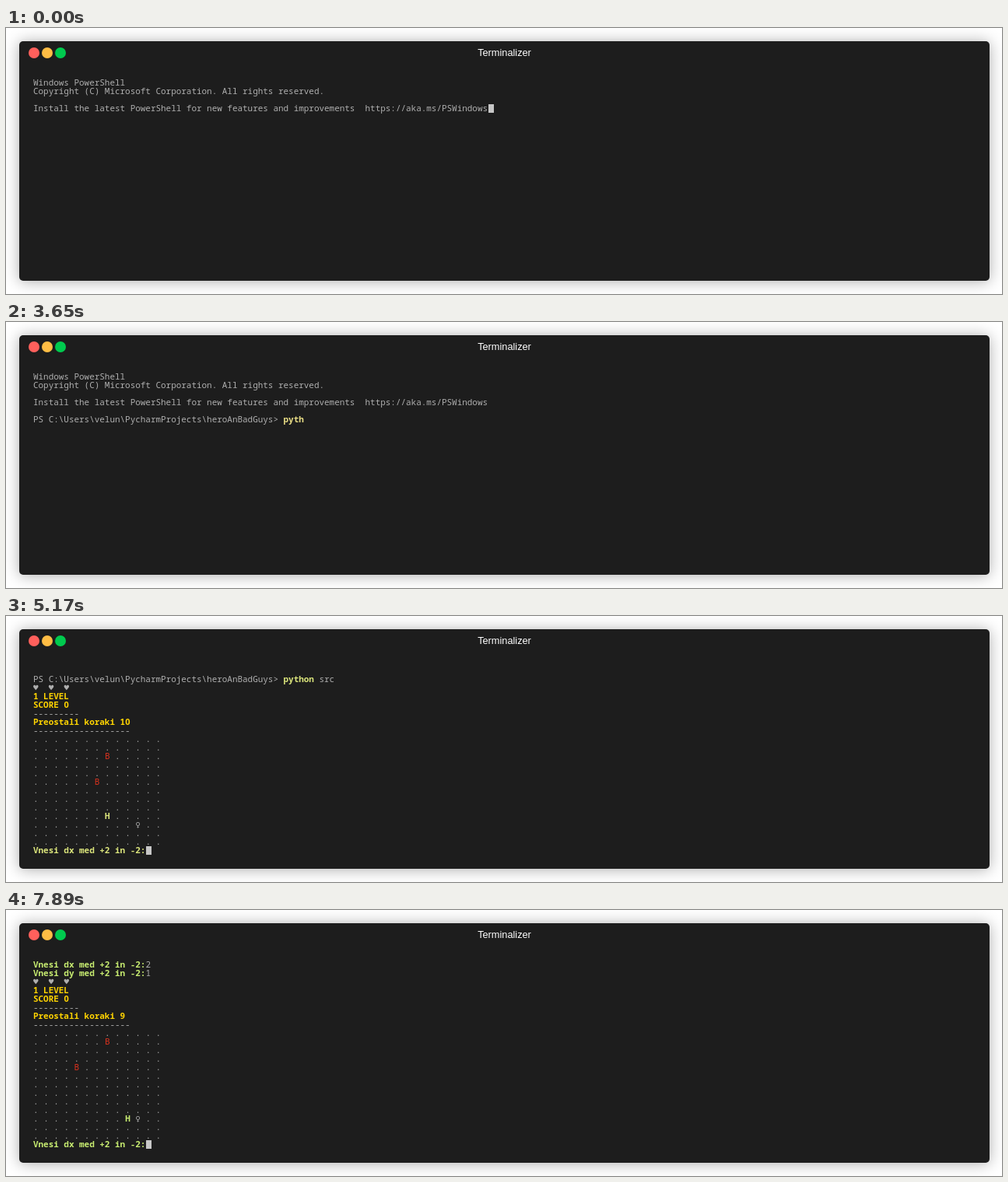
Recreate the animation shown at these times as an HTML page. Size 1280 by 342 pixels, loop 8000 ms.

```html
<!DOCTYPE html>
<html lang="en">
<head>
<meta charset="utf-8">
<title>Terminal session</title>
<style>
  html, body { margin: 0; width: 100%; height: 100%; overflow: hidden; background: #fff; }
  #window {
    position: absolute; left: 17px; top: 17px; width: 1247px; height: 308px;
    border-radius: 5px; background: #1d1d1d; box-shadow: 0 1px 19px rgba(0, 0, 0, .33);
  }
  .dot { position: absolute; top: 8px; width: 14px; height: 14px; border-radius: 50%; }
  #title {
    position: absolute; left: 0; right: 0; top: 5px; line-height: 20px; text-align: center;
    font-family: "Liberation Sans", Arial, sans-serif; font-size: 12.75px; color: #fff;
  }
  #screen {
    position: absolute; left: 35px; top: 64px; color: #afafaf; white-space: pre;
    font: 10.955px/11px "Noto Sans Mono", "DejaVu Sans Mono", monospace;
    font-variant-ligatures: none;
  }
  #screen div { height: 11px; }
  .accent { color: var(--accent); font-weight: 700; }
  .gold { color: #ffd400; font-weight: 700; }
  .zero { font-family: "Open Sans", sans-serif; }
  .enemy { color: #e0321e; }
  .sym { font-family: "DejaVu Sans Mono", monospace; }
  #cursor { position: absolute; width: 7px; height: 11px; background: #c7c7c7; }
</style>
</head>
<body>
<div id="window">
  <div class="dot" style="left:11.5px;background:#ff605c"></div>
  <div class="dot" style="left:28.5px;background:#ffbd44"></div>
  <div class="dot" style="left:45.5px;background:#00ca4e"></div>
  <div id="title">Terminalizer</div>
</div>
<div id="screen"></div>
<div id="cursor"></div>
<script>
const LOOP = 8000, ROWS = 22, CELL_W = 6.573, CELL_H = 11, LEFT = 35, TOP = 65;
const PALE = '#ebdf86', LIME = '#c8ed71', MIXED = '#dce67c';
const screenEl = document.getElementById('screen');
const cursorEl = document.getElementById('cursor');

// A line is a list of [text, class] runs.
const plain = text => [[text, '']];
const intro = [
  plain('Windows PowerShell'),
  plain('Copyright (C) Microsoft Corporation. All rights reserved.'),
  [],
  plain('Install the latest PowerShell for new features and improvements  https://aka.ms/PSWindows')
];
const command = 'python src';
const prompt = count => [
  ['PS C:\\Users\\velun\\PycharmProjects\\heroAnBadGuys> ', ''],
  [command.slice(0, Math.min(count, 6)), 'accent'],
  [command.slice(6, Math.max(count, 6)), '']
];
const ask = (axis, answer = '') => [[`Vnesi d${axis} med +2 in -2:`, 'accent'], [answer, '']];
const hearts = [['♥  ♥  ♥', 'sym']];

function gold(text) {
  const stem = text.replace(/0$/, '');
  return [[stem, 'gold'], [text.slice(stem.length), 'gold zero']];
}

// Pieces are [column, row, glyph, class] on a 13 by 13 field.
function field(pieces) {
  return Array.from({ length: 13 }, (_, y) => {
    const line = [];
    for (let x = 0; x < 13; x++) {
      const piece = pieces.find(p => p[0] === x && p[1] === y);
      line.push(piece ? [piece[2], piece[3]] : ['.', '']);
      if (x < 12) line.push([' ', '']);
    }
    return line;
  });
}

const board = (left, pieces) => [
  hearts, gold('1 LEVEL'), gold('SCORE 0'), plain('-'.repeat(9)),
  gold('Preostali koraki ' + left), plain('-'.repeat(19)),
  ...field([...pieces, [10, 10, '♀', 'sym']])
];

const steps = [];
const add = (time, lines, cursor = true, accent = PALE) =>
  steps.push({ time, lines: lines.slice(-ROWS), cursor, accent });

// Startup and typing: the cursor hides just before each new character.
const typed = count => [...intro, [], prompt(count)];
add(0, intro);
add(20, typed(0), false);
add(160, typed(0));
[2010, 3080, 3340, 3560, 3650, 3870, 4050, 4200, 4360, 4620].forEach((time, i) => {
  add(time, typed(i), false);
  add(time + (i === 9 ? 100 : 20), typed(i + 1));
});

// Game output
const run = typed(command.length);
add(4950, [...run, []]);
add(5120, [...run, hearts, []]);
const first = [...run, ...board(10, [
  [7, 2, 'B', 'enemy'], [6, 5, 'B', 'enemy'], [7, 9, 'H', 'accent']
])];
add(5150, [...first, []], true, MIXED);
add(5170, [...first, ask('x')], true, MIXED);
add(7170, [...first, ask('x', '2')], true, MIXED);
const moved = [...first, ask('x', '2')];
add(7390, [...moved, []], true, LIME);
add(7410, [...moved, ask('y')], true, LIME);
add(7590, [...moved, ask('y', '1')], true, LIME);
const answered = [...moved, ask('y', '1')];
add(7790, [...answered, []], true, LIME);
add(7890, [...answered, ...board(9, [
  [7, 1, 'B', 'enemy'], [4, 4, 'B', 'enemy'], [9, 10, 'H', 'accent']
]), ask('x')], true, LIME);

function draw({ lines, cursor, accent }) {
  screenEl.style.setProperty('--accent', accent);
  screenEl.replaceChildren(...lines.map(line => {
    const row = document.createElement('div');
    for (const [text, style] of line) {
      if (!text) continue;
      const run = document.createElement('span');
      run.className = style;
      run.textContent = text;
      row.append(run);
    }
    return row;
  }));
  const last = lines.length - 1;
  const column = lines[last].reduce((sum, run) => sum + run[0].length, 0);
  cursorEl.style.left = Math.round(LEFT + column * CELL_W) + 'px';
  cursorEl.style.top = TOP + last * CELL_H + 'px';
  cursorEl.style.visibility = cursor ? 'visible' : 'hidden';
}

const start = performance.now();
let shown = null;
function tick() {
  const time = (performance.now() - start) % LOOP;
  const step = steps.findLast(s => s.time <= time);
  if (step !== shown) draw(shown = step);
  requestAnimationFrame(tick);
}
tick();
</script>
</body>
</html>
```
